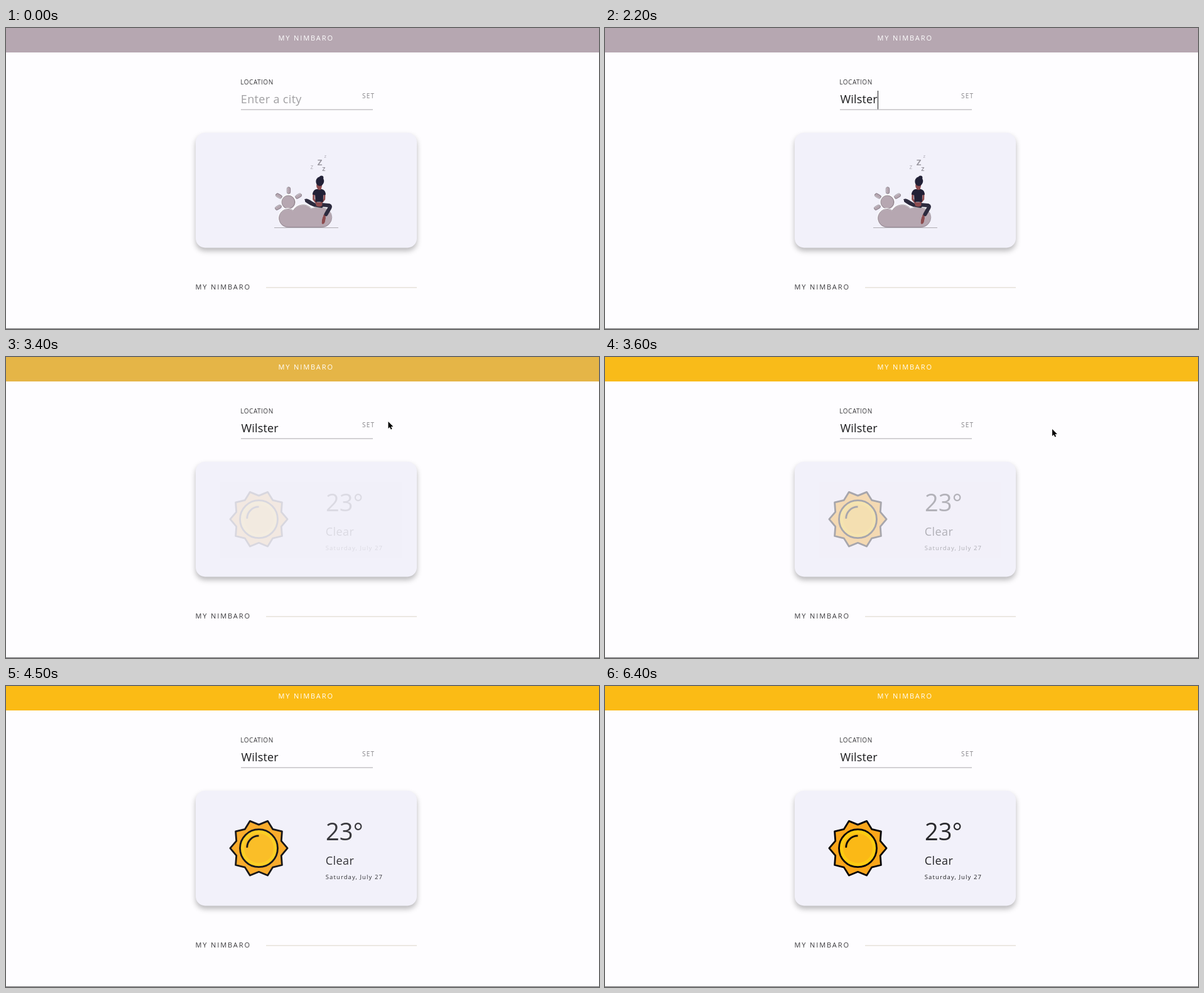
Recreate the animation shown at these times as an HTML page with a canvas. Size 944x480 px, loop 6.6 s.

```html
<!DOCTYPE html>
<html lang="en">
<head>
<meta charset="utf-8">
<title>Weather card</title>
<style>
html, body { margin: 0; width: 100%; height: 100%; overflow: hidden; background: #fefdff; }
canvas { display: block; width: 944px; height: 480px; }
</style>
</head>
<body>
<canvas id="stage"></canvas>
<script>
const W = 944, H = 480, LOOP = 6600, STEP = 100;
const TITLE = 'MY NIMBARO', CITY = 'Wilster';
const MAUVE = [182, 167, 177], GOLD = [251, 187, 21];
const CLOUD = '#b6a7b1', DARK = '#2d2b3e', SHIRT = '#222137', SKIN = '#8d4c4f', CARD = '#f2f1fa';

const canvas = document.getElementById('stage');
const ctx = canvas.getContext('2d');
const dpr = window.devicePixelRatio || 1;
canvas.width = W * dpr;
canvas.height = H * dpr;

const clamp = v => Math.max(0, Math.min(1, v));
const rgb = c => `rgb(${c.map(Math.round).join(',')})`;
const mix = (a, b, k) => a.map((v, i) => v + (b[i] - v) * k);

// CSS "ease": cubic-bezier(.25, .1, .25, 1)
function ease(x) {
  x = clamp(x);
  let lo = 0, hi = 1, s = x;
  const curve = (a, b, u) => 3 * a * u * (1 - u) ** 2 + 3 * b * u * u * (1 - u) + u ** 3;
  for (let i = 0; i < 24; i++) {
    s = (lo + hi) / 2;
    if (curve(.25, .25, s) < x) lo = s; else hi = s;
  }
  return curve(.1, 1, s);
}

function text(str, x, y, size, color, spacing = 0, weight = 400) {
  ctx.font = `${weight} ${size}px "Open Sans", "Noto Sans", sans-serif`;
  ctx.letterSpacing = spacing + 'px';
  ctx.fillStyle = color;
  ctx.fillText(str, x, y);
  return ctx.measureText(str).width;
}

function rect(x, y, w, h, color) {
  ctx.fillStyle = color;
  ctx.fillRect(x, y, w, h);
}

function paint(path, fill, stroke, width = 1) {
  if (fill) { ctx.fillStyle = fill; ctx.fill(path); }
  if (stroke) { ctx.strokeStyle = stroke; ctx.lineWidth = width; ctx.stroke(path); }
}

function ellipse(x, y, rx, ry, fill, stroke, width, tilt = 0) {
  const p = new Path2D();
  p.ellipse(x, y, rx, ry, tilt, 0, Math.PI * 2);
  paint(p, fill, stroke, width);
}

const disc = (x, y, r, fill, stroke, width) => ellipse(x, y, r, r, fill, stroke, width);

function limb(d, width, color) {
  ctx.lineCap = ctx.lineJoin = 'round';
  paint(new Path2D(d), null, color, width);
}

function card() {
  ctx.save();
  ctx.shadowColor = 'rgba(0,0,0,.27)';
  ctx.shadowBlur = 9 * dpr;
  ctx.shadowOffsetY = 5 * dpr;
  ctx.beginPath();
  ctx.roundRect(302, 167, 352, 183.5, 15);
  ctx.fillStyle = CARD;
  ctx.fill();
  ctx.restore();
}

function ray(x, y, turn) {
  ctx.save();
  ctx.translate(x, y);
  ctx.rotate(turn);
  const p = new Path2D();
  p.roundRect(-2.7, -5.3, 5.4, 10.6, 2.7);
  paint(p, '#fff');
  ctx.translate(.5, .6);
  paint(p, CLOUD);
  ctx.translate(-.7, -.2);
  paint(p, null, '#716a74', .6);
  ctx.restore();
}

function cloudScene() {
  ray(450, 258.5, 0);
  ray(434, 267.6, -1.05);
  ray(466, 267.8, 1.05);
  ray(433.8, 286, 1.05);
  disc(449.6, 277.3, 12, '#fff');
  disc(449.8, 277.8, 10.8, CLOUD);
  disc(449.3, 277.5, 10.4, null, '#746c76', .6);

  const cloud = new Path2D('M449 318 A14.5 14.5 0 1 1 457 291.5 A18 18 0 0 1 486 288.2 ' +
    'Q490 286.8 495 287 L503 287 A15.5 15.5 0 0 1 503 318 Z');
  ctx.save();
  ctx.translate(-.5, -1.4);
  paint(cloud, '#fff', '#fff', 1.2);
  ctx.restore();
  paint(cloud, CLOUD);
  ctx.save();
  ctx.translate(.3, -.6);
  paint(cloud, null, '#817783', .6);
  ctx.restore();
  rect(427, 318, 102, .9, '#a7a5ab');

  // seated figure
  limb('M507 299 L506 308', 3.6, SKIN);
  paint(new Path2D('M504.5 301 L509 302 Q508 308 507 311 Q504 314 502.7 311.5 Q502.4 306 504.5 301Z'), SKIN);
  limb('M497 281.5 L514.5 283 Q517 284 515.3 287 L509.5 297', 6, DARK);
  limb('M479 275.5 Q485 279.5 492 282.5 L502 284', 5.8, DARK);
  paint(new Path2D('M475 273 Q479 271.5 484 274.5 L491 279 L489 284 Q477 280 475 273Z'), DARK);
  limb('M490 264 L489.7 273 L496 281', 3, SKIN);
  limb('M507 264 L506.7 273 L500 281', 3, SKIN);
  paint(new Path2D('M494 257 L503 257 Q509 258.5 508.8 266 L505 266.5 L504.8 277.5 L492.5 277.5 ' +
    'L492 266.5 L487.8 265.5 Q488.5 258.5 494 257Z'), SHIRT);
  ellipse(498.4, 281.5, 5.2, 3.6, SKIN);
  paint(new Path2D('M496 250 L502 250 L502 257 Q499 259.5 496 257Z'), SKIN);
  ellipse(498.6, 251.5, 4.4, 5.6, SKIN);
  ellipse(499.8, 244.6, 6.4, 7.4, SHIRT, null, 0, .2);
  disc(502.2, 238.6, 3.2, SHIRT);

  text('z', 495.6, 219, 17, '#99969f', 0, 600);
  text('z', 503.3, 228, 11, '#96939c', 0, 600);
  text('z', 484.5, 225, 10, '#b3b0b9');
  text('z', 506.6, 206.5, 7.5, '#aaa7b1');
}

function spinner(t) {
  const k = (t - 3100) / 1000;
  const tail = (-97 + k * 180) * Math.PI / 180;
  disc(477.5, 258.3, 25.6, null, '#d6d5d9', 6.6);
  ctx.beginPath();
  ctx.arc(477.5, 258.3, 25.6, tail, tail + .01 + Math.max(0, k) * 4);
  ctx.lineCap = 'round';
  ctx.lineWidth = 6.6;
  ctx.strokeStyle = '#202024';
  ctx.stroke();
}

function sunIcon(x, y) {
  const star = new Path2D();
  for (let i = 0; i < 20; i++) {
    const a = i * Math.PI / 10, r = i % 2 ? 37.6 : 45.6;
    star.lineTo(x + r * Math.cos(a), y + r * Math.sin(a));
  }
  star.closePath();
  ctx.lineJoin = 'round';
  paint(star, '#faa61a', '#050507', 2.8);
  disc(x, y, 30, '#fdcb12', '#050507', 2.8);
  disc(x, y, 23.5, '#fbb916');
  ctx.beginPath();
  ctx.arc(x, y - 1, 18.8, Math.PI, Math.PI * 1.5);
  ctx.lineCap = 'butt';
  ctx.lineWidth = 2.8;
  ctx.stroke();
}

function forecast(opacity) {
  sunIcon(402.5, 258.7);
  text('23°', 509, 246, 38, '#29292c');
  text('Clear', 508.8, 285, 18, '#232326', .4);
  text('Saturday, July 27', 508.8, 308, 9.5, '#1f1f22', 1.1);
  ctx.globalAlpha = 1 - opacity;
  rect(340, 200, 290, 120, CARD);
  ctx.globalAlpha = 1;
}

function field(t) {
  const starts = [1000, 1300, 1400, 1600, 1700, 1800, 1900];
  const typed = CITY.slice(0, starts.filter(s => t >= s).length);
  text('LOCATION', 373.3, 89.8, 10, '#39383b', .5);
  text('SET', 567, 112, 10, '#858488', 1.2);
  rect(374, 129.5, 210, 1.5, '#c6c4c7');
  const width = typed ? text(typed, 374.5, 119.6, 18, '#19191b', .15) : 0;
  if (!typed) text('Enter a city', 373.8, 119.6, 18, '#a09fa2', .35);
  if (t >= 800 && t < 2400) rect(typed ? 374.8 + width : 374, 100, 1, 29.5, '#202022');
}

// pointer stops: time, x, y
const PATH = [
  [2300, 597, 126], [2400, 591, 117], [2600, 578, 102], [3200, 578, 102], [3300, 586, 102],
  [3400, 608.5, 103], [3600, 712, 115], [4000, 948, 141]
];

function pointer(t) {
  const i = PATH.findIndex(p => p[0] > t);
  if (i < 1) return;
  const [a, b] = [PATH[i - 1], PATH[i]];
  const [, x, y] = mix(a, b, (t - a[0]) / (b[0] - a[0]));
  const hand = t >= 2500 && t < 3300;
  ctx.save();
  ctx.translate(x, y);
  ctx.lineJoin = ctx.lineCap = 'round';
  if (hand) {
    paint(new Path2D('M3.2 8.5 L2.2 2.8 Q2.6 1 4 2.2 L5.4 5.8 Q6.8 4.6 7.5 5.6 Q9 4.7 9.6 6 ' +
      'Q11 5.4 11.5 7.5 Q12 11 10.8 12.2 L10.6 14.5 L5.2 14.5 Q4.6 12.6 .8 9.4 Q.5 7.4 3.2 8.5Z'),
      '#fff', '#111', 1);
    paint(new Path2D('M6.2 9.2 V12 M7.8 9.2 V12 M9.3 9.2 V12'), null, '#333', .6);
  } else {
    paint(new Path2D('M0 0 L0 11 L2.5 8.7 L4.2 12.6 L6 11.8 L4.4 8 L7.8 8Z'), '#000', '#fff', 1.4);
    paint(new Path2D('M0 0 L0 11 L2.5 8.7 L4.2 12.6 L6 11.8 L4.4 8 L7.8 8Z'), '#000');
  }
  ctx.restore();
}

function draw(t) {
  ctx.setTransform(dpr, 0, 0, dpr, 0, 0);
  rect(0, 0, W, H, '#fefdff');
  rect(0, 0, W, 39, rgb(mix(MAUVE, GOLD, ease((t - 3200) / 500))));
  rect(0, 479, W, 1, '#717073');
  text(TITLE, 433.4, 20.4, 11, '#fff', 1.9);

  card();
  if (t < 3000) cloudScene();
  else if (t < 3300) spinner(t);
  else forecast(ease((t - 3180) / 2000));

  text(TITLE, 301.4, 417.4, 11, '#39383b', 1.9);
  rect(414, 413.3, 240, 1.2, '#e2dccf');
  field(t);
  pointer(t);
}

const start = performance.now();
function tick() {
  const t = (performance.now() - start) % LOOP;
  draw(Math.floor(t / STEP) * STEP);
  requestAnimationFrame(tick);
}
tick();
</script>
</body>
</html>
```
